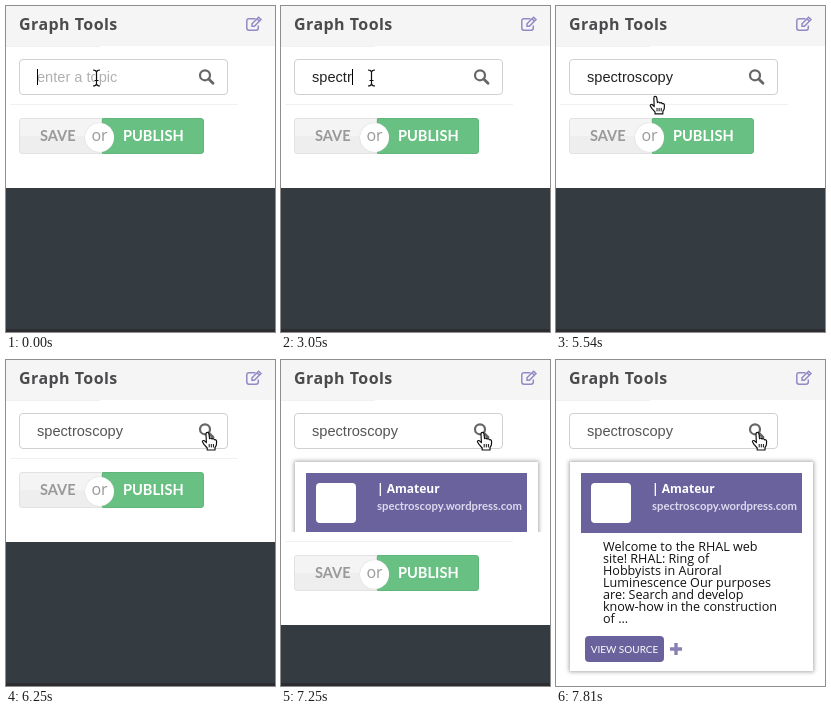
Animation, 269 px wide and 326 px high, one loop 8000 ms. Source, as an HTML page:

```html
<!DOCTYPE html>
<html lang="en">
<head>
<meta charset="utf-8">
<title>Graph Tools</title>
<style>
  html, body { margin: 0; width: 100%; height: 100%; overflow: hidden; }
  body { position: relative; background: #343c42; font-family: "Open Sans", "Noto Sans", sans-serif; }
  div, span, b, svg { position: absolute; box-sizing: border-box; white-space: nowrap; }
  svg { overflow: visible; }

  #floor { left: 0; right: 0; top: 323px; height: 3px; background: #2d2c30; }
  #panel { left: 0; top: 0; width: 269px; background: #fff; }
  #head { left: 0; top: 0; width: 269px; height: 40px; background: #f5f5f5; }
  #head b { left: 13px; top: 7px; font: 700 16px/22px "Open Sans", sans-serif; letter-spacing: .45px; color: #4b4a4c; }
  .rule { height: 1px; background: #f1f1f1; }

  #field { left: 13px; top: 53px; width: 209px; height: 36px; border: 1px solid #d0d0d0; border-radius: 4px; background: #fff; }
  #hint, #typed { left: 31px; top: 62px; height: 18px; font: 14.6px/18px "Liberation Sans", Arial, sans-serif; }
  #hint { color: #b0b0b0; animation: hint 8s step-end infinite; }
  #typed { overflow: hidden; color: #222; animation: type 8s step-end infinite, dim 8s step-end infinite; }
  #caret { left: 31px; top: 63px; width: 1px; height: 16px; background: #000;
    animation: step 8s step-end infinite, blink 8s step-end infinite; }

  #list { left: 0; top: 89px; width: 269px; overflow: hidden; }
  .card { left: 14px; width: 243px; height: 209px; background: #fff; box-shadow: 0 0 4px 1px #aaa; }
  .band { left: 11px; top: 11px; width: 221px; height: 60px; background: #6a629c; color: #fff; }
  .pic { left: 10px; top: 10px; width: 40px; height: 40px; border-radius: 4px; background: #fff; }
  .name { left: 71px; top: 7px; font: 700 12px/17px "Open Sans", sans-serif; }
  .site { left: 71px; top: 24px; font: 700 11.3px/17px Lato, sans-serif; color: #dcd8ee; }
  .text { left: 33px; top: 79px; font: 12.6px/12px "Open Sans", sans-serif; color: #111; }
  .view { left: 15px; top: 174px; width: 79px; height: 26px; border-radius: 4px; background: #6a629c;
    font: 10px/26px Lato, sans-serif; color: #fff; text-align: center; }

  #acts { left: 0; bottom: 0; width: 269px; height: 84px; }
  .btn { top: 14px; height: 36px; font: 700 14.6px/34px Lato, sans-serif; }
  .save { left: 13px; width: 83px; padding-left: 20px; color: #999; border: 1px solid #e2e2e2;
    border-radius: 3px 0 0 3px; background: linear-gradient(#f4f4f4 50%, #eee 50%); }
  .pub { left: 96px; width: 102px; padding-left: 20px; color: #fff; border: 1px solid #5fb67a;
    border-radius: 0 3px 3px 0; background: #68c182; }
  .or { left: 79px; top: 19px; width: 29px; height: 29px; border-radius: 50%; background: #fff;
    font: 16px/25px "Open Sans", sans-serif; color: #999; text-align: center; box-shadow: 0 0 1px #bbb; }

  #mouse { left: 0; top: 0; width: 0; height: 0; offset-rotate: 0deg;
    offset-path: path("M90 72C105 110 150 131 180 131C212 131 222 100 203 73"); }
  #beam { animation: beam 8s step-end infinite; }
  #hand { animation: hand 8s step-end infinite; }

  @keyframes hint { 8.25% { visibility: hidden; } to { visibility: hidden; } }
  @keyframes type {
    0% { width: 0; } 8.25% { width: 7px; } 13.5% { width: 15px; } 15.75% { width: 23px; }
    18.75% { width: 31px; } 23.25% { width: 35px; } 25.5% { width: 40px; } 49.375% { width: 48px; }
    51.625% { width: 55px; } 54.625% { width: 63px; } 57.625% { width: 71px; } 59.75% { width: 79px; }
    62.75%, to { width: 88px; }
  }
  @keyframes step {
    0% { translate: 0; } 8.25% { translate: 7px; } 13.5% { translate: 15px; } 15.75% { translate: 23px; }
    18.75% { translate: 31px; } 23.25% { translate: 35px; } 25.5% { translate: 40px; } 49.375% { translate: 48px; }
    51.625% { translate: 55px; } 54.625% { translate: 63px; } 57.625% { translate: 71px; } 59.75% { translate: 79px; }
    62.75%, to { translate: 86px; }
  }
  @keyframes blink {
    0%, 8.25%, 38.125%, 49.375%, 75.5% { opacity: 1; }
    5.25%, 31.5%, 44.125%, 69%, 78.125%, to { opacity: 0; }
  }
  @keyframes dim { 78.125%, to { color: #555; } }
  @keyframes beam { 68.25%, to { visibility: hidden; } }
  @keyframes hand { 0% { visibility: hidden; } 68.25%, to { visibility: visible; } }
</style>
</head>
<body>
<div id="floor"></div>
<div id="panel">
  <div id="acts">
    <div class="rule" style="left:4px;top:0;width:228px"></div>
    <div class="btn save">SAVE</div>
    <div class="btn pub">PUBLISH</div>
    <div class="or">or</div>
  </div>
</div>
<div id="list">
  <div class="card" style="top:13px">
    <div class="band">
      <div class="pic"></div>
      <div class="name">| Amateur</div>
      <div class="site">spectroscopy.wordpress.com</div>
    </div>
    <div class="text">Welcome to the RHAL web<br>site! RHAL: Ring of<br>Hobbyists in Auroral<br>Luminescence Our purposes<br>are: Search and develop<br>know-how in the construction<br>of ...</div>
    <div class="view">VIEW SOURCE</div>
    <svg style="left:100px;top:181px" width="12" height="12"><path d="M6 0V12M0 6H12" stroke="#8a80b6" stroke-width="3.4"/></svg>
  </div>
  <div class="card" style="top:236px"></div>
</div>
<div id="head">
  <b>Graph Tools</b>
  <svg style="left:240px;top:10px" width="17" height="16" fill="none" stroke="#9389c4" stroke-width="1.5">
    <path d="M9.5 2.7H3Q.8 2.7.8 5V12Q.8 14.2 3 14.2H10Q12.3 14.2 12.3 12V9.5"/>
    <path d="M6 10.2V7.8L12.6 1.2L15 3.6L8.4 10.2ZM11 2.8L13.4 5.2"/>
  </svg>
</div>
<div class="rule" style="left:0;top:40px;width:94px"></div>
<div id="field"></div>
<svg style="left:192px;top:62px" width="17" height="17" fill="none" stroke="#666">
  <circle cx="7" cy="7.3" r="5" stroke-width="2.2"/><path d="M10.7 11L15 15.2" stroke-width="2.8" stroke-linecap="round"/>
</svg>
<span id="hint">enter a topic</span>
<span id="typed">spectroscopy</span>
<div id="caret"></div>
<div id="mouse">
  <svg id="beam" width="1" height="1" fill="none">
    <g id="bar"><path d="M-3 -8Q0 -8 .5 -6Q1 -8 4 -8M.5 -6V6M-3 8Q0 8 .5 6Q1 8 4 8M-1.5 2.5H2.5" stroke="#fff" stroke-width="2.6"/>
    <path d="M-3 -8Q0 -8 .5 -6Q1 -8 4 -8M.5 -6V6M-3 8Q0 8 .5 6Q1 8 4 8M-1.5 2.5H2.5" stroke="#111" stroke-width="1.2"/></g>
  </svg>
  <svg id="hand" width="1" height="1">
    <path d="M-3 1.2Q-3 -.6 -1.6 -.6Q-.2 -.6 0 1.2L.6 5.6Q2.2 4.4 3 6Q4.6 5 5.4 6.8Q7.4 6.2 7.6 8.4L7.4 12L6 14.6V17H-1.8V15L-5 11.4L-6.6 8.8Q-6.6 7.2 -4.8 7.6L-2.6 9.6Z" fill="#fff" stroke="#111" stroke-width="1.2" stroke-linejoin="round"/>
    <path d="M.2 11V14.4M2.3 11V14.4M4.4 11V14.4" stroke="#111"/>
  </svg>
</div>
<script>
  const LOOP = 8000;
  const $ = id => document.getElementById(id);

  // Eased keys [ms, value, easing], sampled at the screen's coarse refresh.
  function run(el, prop, unit, keys) {
    const frames = keys.map(([ms, v, easing = "linear"]) =>
      ({ offset: ms / LOOP, [prop]: v + unit, easing }));
    el.animate(frames, { duration: LOOP, delay: -4, iterations: Infinity, easing: "steps(139)" });
  }
  const curve = (a, b) => `cubic-bezier(.333,${a},.667,${b})`;

  const slide = base => [
    [0, base], [6870, base, curve(0, .33)], [7020, base + 14, curve(.225, .57)],
    [7250, base + 82, curve(.42, .76)], [7700, base + 217, curve(.38, .72)],
    [7810, base + 238, curve(.6, 1)], [7950, base + 250], [LOOP, base + 250]
  ];
  run($("panel"), "height", "px", slide(182));
  run($("list"), "height", "px", slide(0));
  run($("mouse"), "offsetDistance", "%", [
    [0, 0], [5340, 0, "ease-in-out"], [6130, 100], [LOOP, 100]
  ]);
</script>
</body>
</html>
```
